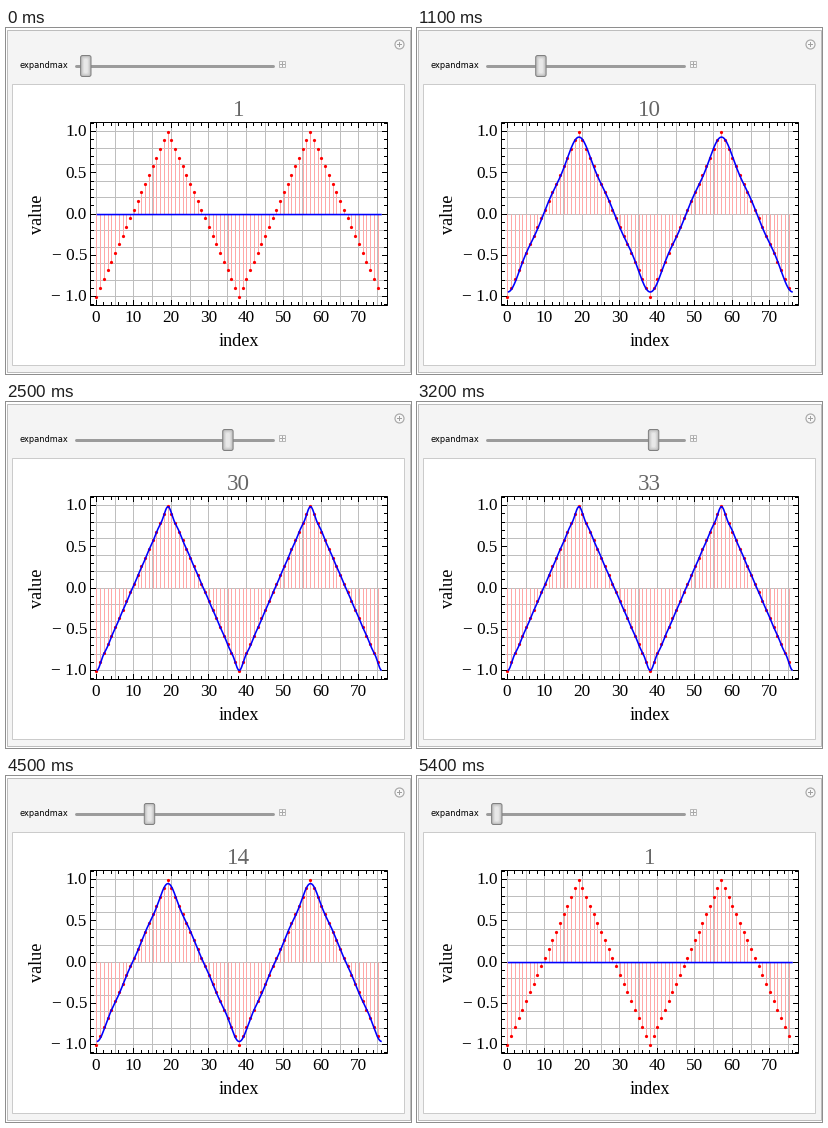
A matplotlib script that plays this animation: 405 by 346 pixels, repeating every 6000 ms.

```python
import numpy as np
import matplotlib.pyplot as plt
from matplotlib.animation import FuncAnimation
from matplotlib.patches import Circle, FancyBboxPatch, Rectangle
from matplotlib.transforms import Affine2D

W, H, DPI = 405, 346, 64
PT = 72 / DPI  # points per pixel
LEFT, RIGHT, TOP, BOTTOM = 84, 381, 94, 277
PERIOD, COUNT = 38, 76
FRAMES, HOLD = 60, 5
LOW, HIGH = 1, 37

fig = plt.figure(figsize=(W / DPI, H / DPI), dpi=DPI, facecolor="white")
ax = fig.add_axes([0, 0, 1, 1])
ax.set_xlim(0, W)
ax.set_ylim(H, 0)
ax.axis("off")


def px(index):
    return 90.25 + 3.75 * index


def py(value):
    return 186.05 - 82.5 * value


def col(index):
    return np.floor(px(index))


def row(value):
    return np.floor(py(value))


# Straight lines snap to whole pixels, so they take pixel numbers.
def line(xs, ys, color, width=1, z=3, **kw):
    return ax.plot(xs, ys, color=color, lw=width * PT, zorder=z, **kw)[0]


def box(x0, y0, x1, y1, face, edge, z=1):
    ax.add_patch(Rectangle((x0, y0), x1 - x0, y1 - y0, fc=face, ec=edge,
                           lw=PT, zorder=z))


def label(x, y, text, size, color="black", font="Liberation Serif", **kw):
    style = dict(ha="center", va="baseline", zorder=8) | kw
    return ax.text(x, y, text, fontsize=size * PT, color=color,
                   family=font, **style)


def plus(x, y, r, color):
    line([x - r, x + r], [y, y], color)
    line([x, x], [y - r, y + r], color)


def draw_panel():
    box(1, 2, 404, 344, "#f4f4f4", "#bdbdbd")
    box(6, 56, 398, 337, "white", "#cbcbcb")
    ax.add_patch(Circle((393.5, 16.5), 4.5, fc="#f8f8f8", ec="#aaaaaa",
                        lw=1.2 * PT, zorder=2))
    plus(393, 16, 2, "#a0a0a0")
    label(13, 40, "expandmax", 8.3, font="DejaVu Sans", ha="left")
    line([70, 267], [38, 38], "#9b9b9b", 3, solid_capstyle="round")
    box(273, 33, 279, 39, "#f8f8f8", "#b8b8b8", 2)
    plus(276, 36, 2, "#a8a8a8")


def draw_ticks():
    for i in range(0, 77, 2):
        size = 5 if i % 10 == 0 else 3
        for y, d in ((BOTTOM, -size), (TOP, size)):
            line([col(i)] * 2, [y, y + d], "black", z=7)
    for j in range(-11, 12):
        size = 5 if j % 5 == 0 else 3
        for x, d in ((LEFT, size), (RIGHT, -size)):
            line([x, x + d], [row(j / 10)] * 2, "black", z=7)
    for i in range(0, 71, 10):
        label(px(i) - 0.5, 294.5, str(i), 17.3)
    for j in range(-2, 3):
        text = f"{j / 2:.1f}".replace("-", "\u2212 ")
        label(81, py(j / 2) + 4.8, text, 17.3, ha="right")


def draw_plot(index, data):
    for i in range(0, 76, 5):
        line([col(i)] * 2, [TOP, BOTTOM], "#bebebe", z=2)
    for j in range(-5, 6):
        line([LEFT, RIGHT], [row(j / 5)] * 2, "#bebebe", z=2)
    ax.vlines(px(index), row(0), py(data), color="#ffa8a8", lw=PT, zorder=3)
    line(px(index), py(data), "red", z=4, ls="none", marker="o",
         ms=3.2 * PT, mew=0)
    box(LEFT, TOP, RIGHT, BOTTOM, "none", "black", 7)
    draw_ticks()
    label(232.5, 318, "index", 18.3)
    label(31, 186.5, "value", 18.3, rotation=90, va="center")


def make_handle():
    """Nested rounded boxes, lightest in the middle."""
    shades = ((5.2, "#bcbcbc"), (4, "#cecece"), (3, "#dcdcdc"), (2, "#e8e8e8"))
    parts = []
    for r, shade in shades:
        top = 32.7 - r
        patch = FancyBboxPatch(
            (-r, top), 2 * r, 76 - 2 * top,
            boxstyle="round,pad=0,rounding_size=2", fc=shade,
            ec="#808080" if r > 5 else "none", lw=PT, zorder=6)
        parts.append(ax.add_patch(patch))
    return parts


index = np.arange(COUNT)
half = PERIOD / 2
data = 1 - 2 * np.abs(index % PERIOD - half) / half
coeffs = np.fft.rfft(data) / COUNT
xs = np.linspace(0, COUNT, 761)


def partial_sum(n):
    k = np.arange(1, n + 1)
    waves = np.exp(2j * np.pi * np.outer(xs, k) / COUNT)
    return coeffs[0].real + 2 * (waves @ coeffs[1:n + 1]).real


draw_panel()
draw_plot(index, data)
handle = make_handle()
title = label(232.5, 88.5, "", 23, color="#666666")
# The curve is not snapped, so it runs through pixel centres.
curve = line(px(xs) + 0.5, py(0 * xs) + 0.5, "blue", 1.6, 5,
             solid_capstyle="butt", snap=False)


def terms_at(frame):
    """Rise and fall evenly, resting at both ends of the loop."""
    step = max(0, min(frame, FRAMES - 1 - frame) - HOLD)
    return round(LOW + (HIGH - LOW) * step / (FRAMES / 2 - HOLD - 0.5))


def update(frame):
    n = terms_at(frame)
    title.set_text(str(n))
    curve.set_ydata(py(partial_sum(n)) + 0.5)
    shift = Affine2D().translate(79.8 + 4.9 * (n - 1), 0) + ax.transData
    for part in handle:
        part.set_transform(shift)
    return [title, curve, *handle]


anim = FuncAnimation(fig, update, frames=FRAMES, interval=100,
                     repeat=True, repeat_delay=0, blit=False)
plt.show()
```
